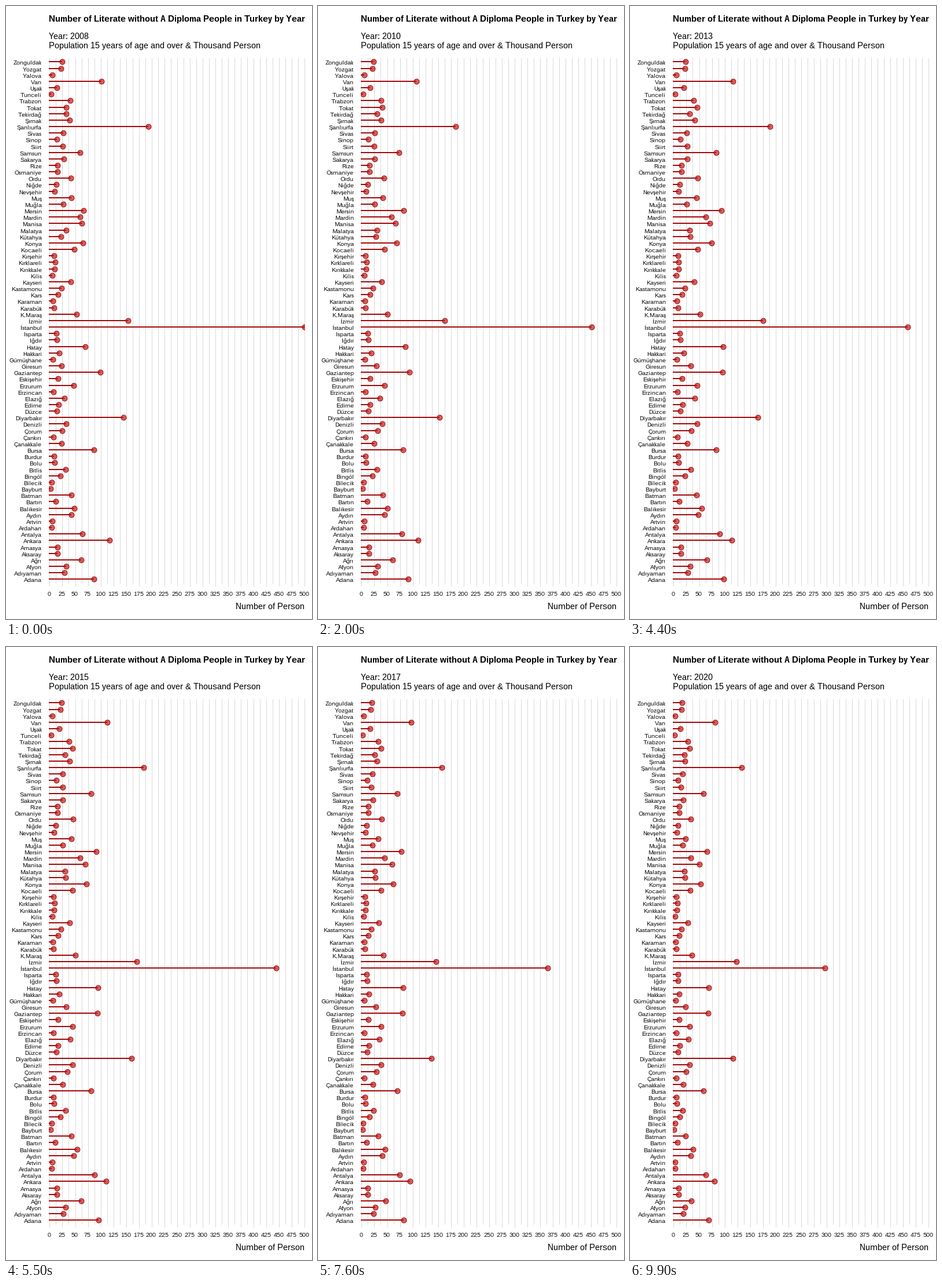
Recreate the animation shown at these times as a matplotlib script. Size 529x1058 px, loop 10000 ms.

```python
import numpy as np
import matplotlib
import matplotlib.pyplot as plt
from matplotlib.animation import FuncAnimation
from matplotlib.collections import LineCollection
from matplotlib.patches import Rectangle

matplotlib.rcParams.update({"font.family": "Liberation Sans",
                            "text.hinting": "native",
                            "text.hinting_factor": 1})

W, H, DPI = 529, 1058, 100
PX = 72 / DPI
FRAMES, INTERVAL = 100, 100
LEFT, RIGHT, TOP, BOTTOM = 74, 516, 90, 996
RED, GRID = "#a50808", "#d9d9d9"

CITIES = """Zonguldak Yozgat Yalova Van Uşak Tunceli Trabzon Tokat Tekirdağ
Şırnak Şanlıurfa Sivas Sinop Siirt Samsun Sakarya Rize Osmaniye Ordu Niğde
Nevşehir Muş Muğla Mersin Mardin Manisa Malatya Kütahya Konya Kocaeli Kırşehir
Kırklareli Kırıkkale Kilis Kayseri Kastamonu Kars Karaman Karabük K.Maraş İzmir
İstanbul Isparta Iğdır Hatay Hakkari Gümüşhane Giresun Gaziantep Eskişehir
Erzurum Erzincan Elazığ Edirne Düzce Diyarbakır Denizli Çorum Çankırı Çanakkale
Bursa Burdur Bolu Bitlis Bingöl Bilecik Bayburt Batman Bartın Balıkesir Aydın
Artvin Ardahan Antalya Ankara Amasya Aksaray Ağrı Afyon Adıyaman Adana""".split()

# Typical size of each city in thousands; everything else follows from the trend
SIZE = np.array([
    24, 22, 6, 113, 20, 4, 39, 45, 31, 40, 183, 26, 14, 26, 82, 27, 16, 16, 47, 13,
    10, 43, 26, 91, 60, 70, 31, 32, 73, 46, 9, 11, 10, 6, 40, 23, 17, 7, 9, 51, 170,
    439, 13, 14, 95, 20, 7, 33, 94, 17, 45, 8, 41, 18, 14, 160, 45, 35, 8, 27,
    82, 9, 10, 32, 22, 5, 3, 43, 12, 54, 48, 6, 5, 88, 111, 15, 15, 62, 32, 28, 96])

# National level for each year, 2008 to 2020
TREND = [1.14, 1.038, 1.042, 1.016, 0.976, 1.055, 1.032, 1.002,
         0.89, 0.872, 0.718, 0.729, 0.677]
KEYS = [round(i * (FRAMES - 1) / 12) for i in range(13)]

# How strongly a group follows the trend, and its relative level before 2010
SWAY = np.full(len(CITIES), 0.8)
EARLY = np.full(len(CITIES), 0.96)


def group(names, sway, early):
    rows = [CITIES.index(n) for n in names.split()]
    SWAY[rows], EARLY[rows] = sway, early


group("İstanbul", 1, 1)
group("Şırnak Muş Bitlis Ağrı Siirt Bingöl Hakkari Batman Mardin", 1.4, 0.85)
group("Manisa Konya İzmir Ordu Van Diyarbakır Adana Balıkesir Aydın Çanakkale",
      0.8, 0.82)
group("Uşak Tokat Samsun Mersin Kütahya Hatay Giresun Elazığ Denizli Çorum Antalya",
      0.8, 0.67)


def values_at(k):
    rise = np.clip((k - 10) / 15, 0, 1)
    level = np.interp(k, KEYS, TREND)
    return SIZE * level ** SWAY * (EARLY + (1 - EARLY) * rise)


def to_x(v):
    return 74.5 + 0.882 * np.asarray(v)


def snap(v):
    return np.floor(np.asarray(v) + 0.5)


fig = plt.figure(figsize=(W / DPI, H / DPI), dpi=DPI, facecolor="white")
ax = fig.add_axes([0, 0, 1, 1])
ax.set_xlim(0, W)
ax.set_ylim(H, 0)
ax.axis("off")


def label(x, y, text, size, ha="left", **kw):
    return ax.text(x, y, text, fontsize=size * PX, ha=ha, va="baseline",
                   color="black", **kw)


for i in range(41):
    x = snap(to_x(i * 12.5) - 0.1) + 0.5
    end = BOTTOM if i % 2 else BOTTOM + 5
    ax.plot([x, x], [TOP, end], color=GRID, lw=PX, zorder=1)
for v in range(0, 501, 25):
    label(to_x(v), 1018, str(v), 10, "center")

rows = snap(96.4 + 11.162 * np.arange(len(CITIES)))
for name, y in zip(CITIES, rows):
    label(62, y + 5, name, 10, "right")

label(LEFT, 27, "Number of Literate without A Diploma People in Turkey by Year",
      15, weight="bold")
year_text = label(LEFT, 57, "Year: 2008", 15)
label(LEFT, 73, "Population 15 years of age and over & Thousand Person", 15)
label(RIGHT, 1041, "Number of Person", 15, "right")

panel = Rectangle((LEFT, TOP), RIGHT - LEFT, BOTTOM - TOP, transform=ax.transData)
stems = LineCollection([], colors=RED, linewidths=2 * PX, zorder=2, capstyle="butt")
ax.add_collection(stems)
dots = ax.scatter(np.full(len(rows), LEFT), rows, s=(9 * PX) ** 2, zorder=3,
                  facecolors=[(0.75, 0.08, 0.08, 0.68)], edgecolors=RED,
                  linewidths=PX)
for art in (stems, dots):
    art.set_clip_path(panel)


def update(k):
    xs = snap(to_x(values_at(k)) - 0.1)
    stems.set_segments([[(LEFT, y), (x, y)] for x, y in zip(xs, rows)])
    dots.set_offsets(np.column_stack([xs, rows]))
    year_text.set_text(f"Year: {round(2008 + 12 * k / (FRAMES - 1))}")
    return stems, dots, year_text


anim = FuncAnimation(fig, update, frames=FRAMES, interval=INTERVAL,
                     repeat=True, repeat_delay=0, blit=False)
plt.show()
```
